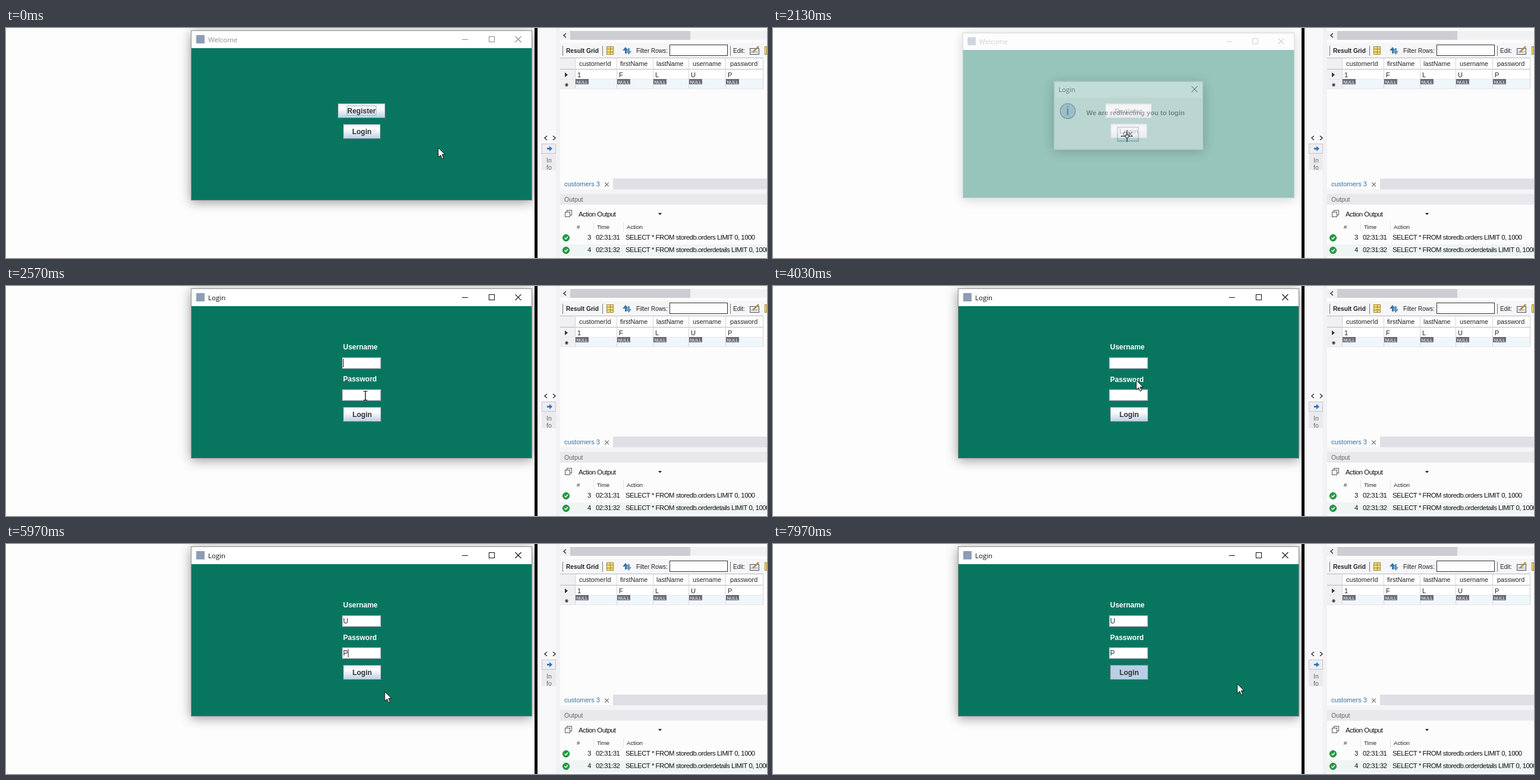
Recreate the animation shown at these times as an HTML page with a canvas. Size 1280x388 px, loop 8000 ms.

```html
<!DOCTYPE html>
<html lang="en">
<head>
<meta charset="utf-8">
<title>Login flow</title>
<style>
html, body { margin: 0; width: 100%; height: 100%; overflow: hidden; background: #fdfdfd; }
canvas { display: block; }
</style>
</head>
<body>
<canvas id="stage" width="1280" height="388"></canvas>
<script>
const LOOP = 8000, W = 1280, H = 388;
const SANS = '"Liberation Sans", Arial, sans-serif', UI = '"Open Sans", sans-serif';
const TEAL = '#08765f', STEEL = '#7a8a99';
const stage = document.getElementById('stage').getContext('2d');
const buffer = Object.assign(document.createElement('canvas'), { width: W, height: H });
const layerCtx = buffer.getContext('2d');
let g = stage;

// Drawing helpers
function box(x, y, w, h, fill, stroke) {
  if (fill) { g.fillStyle = fill; g.fillRect(x, y, w, h); }
  if (stroke) { g.strokeStyle = stroke; g.lineWidth = 1; g.strokeRect(x + .5, y + .5, w - 1, h - 1); }
}
function text(str, x, y, size, color = '#222', weight = '', family = SANS, align = 'left') {
  g.font = `${weight} ${size}px ${family}`;
  g.fillStyle = color;
  g.textAlign = align;
  g.fillText(str, x, y);
}
function tight(str, x, y) {
  g.letterSpacing = '-0.5px';
  text(str, x, y, 11.4, '#111');
  g.letterSpacing = '0px';
}
function path(points, stroke, width = 1, fill) {
  g.beginPath();
  points.forEach(([x, y], i) => i ? g.lineTo(x, y) : g.moveTo(x, y));
  if (fill) { g.closePath(); g.fillStyle = fill; g.fill(); }
  if (stroke) { g.strokeStyle = stroke; g.lineWidth = width; g.stroke(); }
}
function disc(x, y, r, fill, stroke, width = 1) {
  g.beginPath();
  g.arc(x, y, r, 0, 7);
  if (fill) { g.fillStyle = fill; g.fill(); }
  if (stroke) { g.strokeStyle = stroke; g.lineWidth = width; g.stroke(); }
}
function cross(x, y, r, color, width = 1.1) {
  path([[x - r, y - r], [x + r, y + r]], color, width);
  path([[x - r, y + r], [x + r, y - r]], color, width);
}
function chevron(x, y, dir) {
  path([[x - 2 * dir, y - 3.5], [x + 2 * dir, y], [x - 2 * dir, y + 3.5]], '#333', 1.5);
}

// Draws a group with one opacity, scaled about the window centre
function layer(alpha, scale, draw) {
  if (alpha <= 0) return;
  g = layerCtx;
  g.clearRect(0, 0, W, H);
  g.save();
  g.translate(598, 147);
  g.scale(scale, scale);
  g.translate(-598, -147);
  draw();
  g.restore();
  g = stage;
  g.globalAlpha = alpha;
  g.drawImage(buffer, 0, 0);
  g.globalAlpha = 1;
}
function shadowBox(x, y, w, h, fill, blur, alpha) {
  g.save();
  g.shadowColor = `rgba(0,0,0,${alpha})`;
  g.shadowBlur = blur;
  g.shadowOffsetY = 3;
  box(x, y, w, h, fill);
  g.restore();
}

function button(label, x, y, w, h, { pressed, focus } = {}) {
  let fill = '#b8cfe5';
  if (!pressed) {
    fill = g.createLinearGradient(0, y, 0, y + h);
    fill.addColorStop(0, '#e2ebf4');
    fill.addColorStop(.3, '#ffffff');
    fill.addColorStop(.5, '#eef3f8');
    fill.addColorStop(1, '#b8cfe5');
  }
  box(x, y, w, h, fill, STEEL);
  text(label, x + w / 2, y + h / 2 + 4.3, 12, '#333', 'bold', SANS, 'center');
  if (focus) box(x + 15, y + 4, w - 30, h - 8, null, '#a3b8cc');
}
function field(y, value, caret) {
  box(565, y, 66, 20, '#fff', STEEL);
  box(566, y + 1, 64, 18, null, '#dbe4ec');
  text(value, 567, y + 14, 12, '#333');
  if (caret) box(value ? 575 : 567, y + 3, 1, 14, '#333');
}
function frame(title, color) {
  shadowBox(311, 4, 574, 287, '#fff', 18, .4);
  box(311, 4, 574, 287, '#fff', '#8a8f8e');
  box(312, 34, 572, 256, TEAL);
  box(320, 12, 14, 14, '#8c9db5');
  text(title, 340, 23.5, 11.5, color, '', UI);
  path([[767, 19.5], [777, 19.5]], color);
  box(812, 14, 10, 10, null, color);
  cross(861.5, 19, 5, color);
}
function welcome(t) {
  frame('Welcome', '#8c8c8c');
  button('Register', 558, 127, 80, 25, { focus: t < 830 });
  button('Login', 567, 162, 63, 25);
}
function login(t) {
  const name = t >= 4800 ? 'U' : '', pass = t >= 5500 ? 'P' : '', pressed = t >= 7000;
  const on = from => (t - from) % 1000 < 500;
  frame('Login', '#111');
  text('Username', 567, 107, 12, '#fff', 'bold');
  field(120, name, t < 5150 && on(t < 4800 ? 2500 : 4800));
  text('Password', 567, 161.5, 12, '#fff', 'bold');
  field(174, pass, t >= 5150 && !pressed && on(t < 5500 ? 5150 : 5500));
  button('Login', 567, 204, 64, 25, { pressed });
}
function dialog() {
  shadowBox(469, 88, 258, 119, '#fff', 18, .5);
  box(469, 88, 258, 119, '#fff', '#8a9a94');
  box(470, 117, 256, 89, '#eee');
  text('Login', 477, 106.5, 11.5, '#111', '', UI);
  cross(712, 102, 5, '#222');
  disc(493, 140, 13, '#a3b8e0', '#53658c', 1.5);
  text('i', 493, 147, 20, '#2f3f66', 'bold', SANS, 'center');
  text('We are redirecting you to login', 525, 147.5, 11.6, '#333', 'bold');
  button('OK', 578, 167, 38, 26);
  box(579, 168, 36, 24, null, STEEL);
}

function resultGrid() {
  box(932, 50, 342, 19, '#fff');
  box(932, 50, 25, 53, '#f0f0f2');
  box(957, 69, 317, 17, '#fff');
  box(957, 86, 317, 16, '#f0f7fa');
  for (const y of [50, 69, 86, 102]) box(932, y, 342, 1, y < 70 ? '#b8b8bc' : '#e6e6ea');
  const columns = [['customerId', 957, '1', 964], ['firstName', 1027, 'F', 1033], ['lastName', 1088, 'L', 1094],
    ['username', 1148, 'U', 1155], ['password', 1210, 'P', 1218]];
  for (const [head, x, value, tx] of columns) {
    box(x, 50, 1, 52, '#d4d4d9');
    text(head, tx, 64, 10.8);
    text(value, x + 4, 82.5, 11);
    box(x + 1, 86, 22, 9, '#6c6c7c');
    text('NULL', x + 12, 93.5, 7.5, '#fff', '', SANS, 'center');
  }
  box(1273, 50, 1, 52, '#d4d4d9');
  path([[940, 75], [945, 79], [940, 83]], null, 0, '#333');
  for (let i = 0; i < 3; i++) {
    const a = i * Math.PI / 3, dx = 3 * Math.cos(a), dy = 3 * Math.sin(a);
    path([[943 - dx, 96 - dy], [943 + dx, 96 + dy]], '#333', 1.2);
  }
}
function toolbar() {
  box(932, 25, 348, 25, '#f6f6f8');
  for (const x of [936, 1003, 1218]) box(x, 30, 1, 17, '#777');
  text('Result Grid', 942, 42, 10.2, '#222', 'bold');
  box(1010, 31, 12, 14, '#f7df72', '#9a8138');
  path([[1010, 35.5], [1022, 35.5]], '#9a8138');
  path([[1010, 40.5], [1022, 40.5]], '#9a8138');
  path([[1016.5, 31], [1016.5, 45]], '#9a8138');
  path([[1037, 38], [1042, 32], [1047, 38], [1044, 38], [1044, 43], [1041, 43], [1041, 38]], null, 0, '#3b76a8');
  path([[1043, 39], [1046, 39], [1046, 34], [1049, 34], [1049, 39], [1052, 39], [1047.5, 45]], null, 0, '#5e92bd');
  text('Filter Rows:', 1060, 42, 10);
  box(1116, 28, 98, 19, '#fdfdfd', '#333');
  text('Edit:', 1223, 42, 10);
  box(1251, 34, 16, 11, '#e6edf3', '#46545f');
  path([[1251, 40.5], [1267, 40.5]], '#8b98a5');
  path([[1256, 41], [1266, 31]], '#b98b3e', 2.5);
  box(1276, 31, 4, 14, '#f7df72', '#9a8138');
}
function logRow(y, number, time, query) {
  disc(942, y + 1, 5.5, '#23a045', '#187a32');
  path([[939.5, y + 1], [941.5, y + 3], [945, y - 1]], '#fff', 1.5);
  tight(number, 978, y + 4);
  tight(time, 992, y + 4);
  tight(query, 1042, y + 4);
}
function workbench() {
  box(889, 0, 5, H, '#000');
  box(894, 0, 38, H, '#f8f8fa');
  box(925, 0, 7, H, '#f2f2f5');
  chevron(908, 185.5, -1);
  chevron(922, 185.5, 1);
  box(901, 195, 24, 17, '#eeeef2', '#c3c3cc');
  path([[910, 202], [914, 202], [914, 199], [919, 203.5], [914, 208], [914, 205], [910, 205]], null, 0, '#3576c4');
  box(901, 212, 24, 28, '#ebebef');
  text('In', 909, 226.5, 10.5, '#666');
  text('fo', 909, 239, 10.5, '#666');

  box(932, 0, 348, H, '#fcfcfd');
  box(932, 5, 348, 15, '#f1f1f3');
  chevron(940, 12.5, -1);
  box(949, 5, 202, 15, '#cdcdd3');
  toolbar();
  resultGrid();

  box(1021, 254, 259, 18, '#dfdfe5');
  text('customers 3', 939, 267, 11, '#386d9c');
  cross(1010.5, 264, 3.3, '#666');
  box(932, 272, 348, 8, '#f4f4f7');
  box(932, 280, 348, 18, '#e8e8ed');
  text('Output', 939, 293, 10.5, '#666');

  box(943, 307, 9, 9, '#fff', '#555');
  box(940, 310, 9, 9, '#fff', '#555');
  tight('Action Output', 963, 317.5);
  path([[1097, 312], [1103, 312], [1100, 315.5]], null, 0, '#222');
  text('#', 960, 338.5, 9.7);
  text('Time', 994, 338.5, 9.7);
  text('Action', 1044, 338.5, 9.7);
  for (const x of [988, 1038]) box(x, 328, 1, 15, '#e3e3e7');
  box(932, 365, 348, 20, '#eff4f5');
  logRow(353, '3', '02:31:31', 'SELECT * FROM storedb.orders LIMIT 0, 1000');
  logRow(374, '4', '02:31:32', 'SELECT * FROM storedb.orderdetails LIMIT 0, 1000');
}

// Pointer stops: time, x, y
const stops = [[0, 727, 202], [650, 727, 202], [930, 685, 193], [1350, 597, 183], [2000, 595, 182], [2320, 595, 182],
  [2560, 604, 185], [3500, 604, 185], [4000, 611, 159], [4100, 611, 159], [4550, 637, 249], [6350, 637, 249],
  [6850, 602, 218], [7150, 602, 218], [7700, 781, 236], [LOOP, 781, 236]];
function pointerAt(t) {
  const i = stops.findIndex(s => s[0] > t), [t0, x0, y0] = stops[i - 1], [t1, x1, y1] = stops[i];
  const p = (t - t0) / (t1 - t0);
  return [x0 + (x1 - x0) * p, y0 + (y1 - y0) * p];
}
function pointer(t) {
  const [x, y] = pointerAt(t);
  const overField = t > 2400 && x > 565 && x < 631 && (y > 120 && y < 140 || y > 174 && y < 194);
  g.save();
  g.translate(Math.round(x), Math.round(y));
  if (t > 2040 && t < 2320) {
    for (const s of [-1, 1]) {
      path([[s * 3, .5], [s * 10, .5]], '#111');
      path([[.5, s * 3], [.5, s * 10]], '#111');
    }
    disc(.5, .5, 3, null, '#111');
  } else if (overField) {
    path([[.5, -7], [.5, 7]], '#111', 1.4);
    path([[-3, -7.5], [4, -7.5]], '#111');
    path([[-3, 7.5], [4, 7.5]], '#111');
  } else {
    path([[0, 0], [0, 16], [4, 12.5], [6.5, 18.5], [9, 17.5], [6.5, 11.5], [11.5, 11.5], [0, 0]], '#111', 1, '#fff');
  }
  g.restore();
}

const ramp = (t, start, length) => Math.min(1, Math.max(0, (t - start) / length));
const easeOut = p => 1 - (1 - p) ** 3;

function render(t) {
  box(0, 0, W, H, '#fdfdfd');
  const closing = ramp(t, 2040, 155), shrink = 1 - .045 * closing;
  const dialogIn = easeOut(ramp(t, 830, 250)), loginIn = easeOut(ramp(t, 2350, 250));
  layer(1 - closing, shrink, () => welcome(t));
  layer(dialogIn * (1 - closing), (.93 + .07 * dialogIn) * shrink, dialog);
  layer(loginIn, .92 + .08 * loginIn, () => login(t));
  workbench();
  pointer(t);
}

const begin = performance.now();
function tick() {
  render((performance.now() - begin) % LOOP);
  requestAnimationFrame(tick);
}
tick();
</script>
</body>
</html>
```
